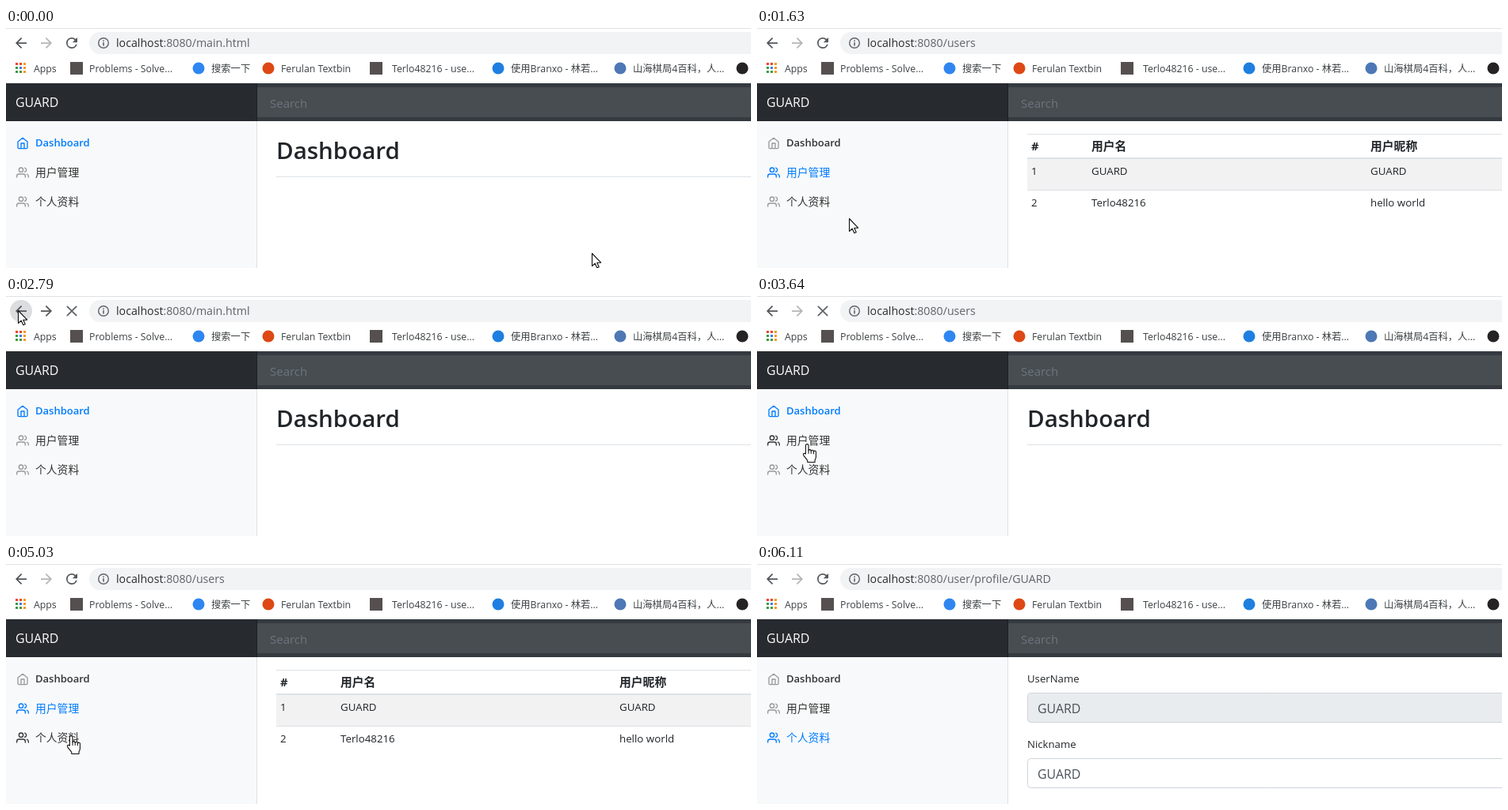
Animation, 940 px wide and 304 px high, one loop 6640 ms. Source, as an HTML page with a canvas:

```html
<!DOCTYPE html>
<html lang="en">
<head>
<meta charset="utf-8">
<title>Dashboard walkthrough</title>
<style>
html, body { margin: 0; width: 100%; height: 100%; overflow: hidden; background: #fff; }
canvas { display: block; width: 940px; height: 304px; }
</style>
</head>
<body>
<canvas id="stage" width="940" height="304"></canvas>
<script>
const ctx = document.getElementById('stage').getContext('2d');
const W = 940, H = 304, LOOP = 6640;
const SANS = '"Open Sans", "Noto Sans CJK SC", "Noto Sans CJK", sans-serif';
const INK = '#212529', BLUE = '#007bff', GREY = '#5f6368', LINE = '#dee2e6';
const USER = 'GUARD', MEMBER = 'Terlo48216';

// [time, value] pairs; each value holds until the next one
const pages = [[0, 'dash'], [1090, 'users'], [2790, 'dash'], [3710, 'users'], [5420, 'profile']];
const urls = [[0, 'main.html'], [1010, 'users'], [2790, 'main.html'], [3640, 'users'],
  [5340, 'user/profile/' + USER]];

// [start, end] spans
const loading = [[860, 1090], [2710, 2940], [3560, 3710], [5260, 5420]];
const clicks = [[790, 860], [2640, 2710], [3480, 3560], [5190, 5260]];
const backHover = [[2640, 2860]];
const canForward = [[2790, 3640]];

// Pointer moves: start, end, then one point per step
const moves = [
  [70, 300, [500, 236], [190, 156], [64, 140], [40, 179]],
  [470, 540, [49, 180], [55, 180]],
  [1090, 1250, [92, 236], [118, 267], [121, 262]],
  [1630, 2240, [116, 241], [106, 214], [92, 186], [72, 152], [48, 120], [24, 92], [8, 70], [30, 54], [49, 46]],
  [2330, 2480, [24, 26], [13, 13], [15, 18]],
  [2860, 3250, [20, 46], [34, 100], [50, 165], [62, 205], [66, 217], [64, 204]],
  [3330, 3480, [64, 197], [63, 190], [63, 188]],
  [4040, 4250, [76, 212], [260, 245], [540, 282], [654, 290]],
  [4500, 5110, [690, 288], [798, 270], [640, 240], [380, 190], [150, 155], [72, 146], [79, 196], [82, 218], [80, 219]],
  [5490, 5650, [400, 230], [760, 240], [960, 250]],
  [5950, 6110, [815, 302], [838, 301], [838, 330]]
];
const pointer = [[0, [739, 285]]];
for (const [start, end, ...points] of moves) {
  points.forEach((p, k) => {
    const t = start + k * (end - start) / (points.length - 1);
    pointer.push([Math.floor(t / 10) * 10, p]);
  });
}

const at = (track, t) => track.filter(([start]) => start <= t).pop()[1];
const within = (spans, t) => spans.some(([a, b]) => t >= a && t < b);

const shapes = {
  home: new Path2D('M3 9l9-7 9 7v11a2 2 0 0 1-2 2H5a2 2 0 0 1-2-2z M9 22V12h6v10'),
  people: new Path2D('M17 21v-2a4 4 0 0 0-4-4H5a4 4 0 0 0-4 4v2 M9 3a4 4 0 1 0 0 8a4 4 0 0 0 0-8 M23 21v-2a4 4 0 0 0-3-3.87 M16 3.13a4 4 0 0 1 0 7.75'),
  back: new Path2D('M20 11H7.83l5.59-5.59L12 4l-8 8 8 8 1.41-1.41L7.83 13H20z'),
  reload: new Path2D('M17.65 6.35A8 8 0 0 0 12 4a8 8 0 1 0 7.73 10h-2.08A6 6 0 1 1 12 6c1.66 0 3.14.69 4.22 1.78L13 11h7V4z'),
  close: new Path2D('M5.5 5.5l13 13M18.5 5.5l-13 13'),
  arrow: new Path2D('M.5.5V16.5L4.2 13.2 6.8 18.8 9.2 17.8 6.7 12.2H11.6z'),
  hand: new Path2D('M-1.6 12V1.4a1.8 1.8 0 0 1 3.6 0V8a1.6 1.6 0 0 1 3.2.5a1.6 1.6 0 0 1 3.2.8a1.5 1.5 0 0 1 3 1V16c0 2-1.4 3-1.4 4.2V22.5H.8V20.5C-.6 18-3 16-4.4 13.4c-.8-1.7 1-2.8 2.8-1.4z'),
  knuckles: new Path2D('M2 8v3.5M5.2 8.5v3M8.4 9.3v2.6')
};

const links = [
  { page: 'dash', label: 'Dashboard', icon: 'home', font: 13, weight: 600 },
  { page: 'users', label: '用户管理', icon: 'people', font: 13.8, weight: 400 },
  { page: 'profile', label: '个人资料', icon: 'people', font: 13.8, weight: 400 }
];

// icon x, icon colour, round?, text x, text
const bookmarks = [
  [89, '#55504f', false, 105, 'Problems - Solve...'],
  [243, '#2f86f0', true, 259, '搜索一下'],
  [331, '#dd4814', true, 347, 'Ferulan Textbin'],
  [467, '#55504f', false, 487, MEMBER + ' - use...'],
  [621, '#1e7fe0', true, 637, '使用Branxo - 林若...'],
  [775, '#4d78b5', true, 791, '山海棋局4百科，人...'],
  [929, '#252323', true, 950, '']
];

function box(x, y, w, h, color) {
  ctx.fillStyle = color;
  ctx.fillRect(x, y, w, h);
}

function disc(x, y, r, color) {
  ctx.fillStyle = color;
  ctx.beginPath();
  ctx.arc(x, y, r, 0, Math.PI * 2);
  ctx.fill();
}

function text(str, x, y, size, color = INK, weight = 400) {
  ctx.font = `${weight} ${size}px ${SANS}`;
  ctx.fillStyle = color;
  ctx.fillText(str, x, y);
  return x + ctx.measureText(str).width;
}

function shape(name, x, y, scale, { fill, stroke, width = 2, flip = false }) {
  ctx.save();
  ctx.translate(x, y);
  ctx.scale(flip ? -scale : scale, scale);
  if (fill) {
    ctx.fillStyle = fill;
    ctx.fill(shapes[name]);
  }
  if (stroke) {
    ctx.strokeStyle = stroke;
    ctx.lineWidth = width;
    ctx.lineJoin = ctx.lineCap = 'round';
    ctx.stroke(shapes[name]);
  }
  ctx.restore();
}

function drawToolbar(t) {
  box(0, 0, W, 1, '#dee1e6');
  if (within(backHover, t)) disc(19, 19, 14, '#dcdddf');
  shape('back', 8.5, 8.5, .875, { fill: '#54575b' });
  shape('back', 61.5, 8.5, .875, { fill: within(canForward, t) ? '#54575b' : '#b4b6b9', flip: true });
  if (within(loading, t)) shape('close', 72.5, 8.5, .875, { stroke: GREY });
  else shape('reload', 72.5, 8.5, .875, { fill: '#54575b' });

  ctx.fillStyle = '#f1f3f4';
  ctx.beginPath();
  ctx.roundRect(105, 5, W, 28, 14);
  ctx.fill();
  ctx.strokeStyle = GREY;
  ctx.lineWidth = 1.4;
  ctx.beginPath();
  ctx.arc(123, 19, 6.3, 0, Math.PI * 2);
  ctx.stroke();
  box(122.2, 15.5, 1.6, 1.6, GREY);
  box(122.2, 18.2, 1.6, 4.3, GREY);
  const x = text('localhost', 139, 24, 14.2, '#2b2d30');
  text(':8080/' + at(urls, t), x, 24, 14.2, GREY);
}

function drawBookmarks() {
  const [r, y, g, b] = ['#e8492f', '#f29b1d', '#3f9b46', '#3f80e8'];
  [r, r, y, g, b, y, g, g, y].forEach((color, i) =>
    box(12 + i % 3 * 5, 44 + Math.floor(i / 3) * 5, 3, 3, color));
  text('Apps', 35, 56, 12.3, '#3c4043');
  for (const [cx, color, round, x, label] of bookmarks) {
    if (round) disc(cx, 51, 7.5, color);
    else box(cx - 8, 43, 16, 16, color);
    text(label, x, 56, 12.3, '#3c4043');
  }
}

function drawHeader() {
  box(0, 70, W, 48, '#343a40');
  box(0, 70, 317, 48, '#272a2f');
  box(316, 70, 1, 48, '#1d2023');
  box(317, 75, W, 38, '#484d51');
  text(USER, 12, 100, 15.9, '#fff');
  text('Search', 333, 101, 15, '#6c757d');
}

function drawSidebar(page, hovered) {
  box(0, 118, 316, H - 118, '#f8f9fa');
  box(316, 118, 1, H - 118, '#dfe0e1');
  links.forEach((link, i) => {
    const active = link.page === page, y = 138 + i * 37;
    const color = active ? BLUE : hovered === i ? '#333' : '#999';
    shape(link.icon, 13, y, 2 / 3, { stroke: color });
    text(link.label, 37, y + (i ? 13 : 12), link.font, active ? BLUE : '#333', link.weight);
  });
}

function field(label, value, y, fill) {
  text(label, 341, y - 13, 13.2);
  ctx.beginPath();
  ctx.roundRect(341.5, y + .5, W, 37, 4);
  ctx.fillStyle = fill;
  ctx.fill();
  ctx.strokeStyle = '#ced4da';
  ctx.lineWidth = 1;
  ctx.stroke();
  text(value, 354, y + 26, 15.9, '#495057');
}

function row(cells, y, size, weight) {
  cells.forEach((cell, i) => text(cell, [346, 422, 774][i], y, size, INK, weight));
}

const content = {
  dash() {
    text('Dashboard', 341, 166, 29.5, INK, 600);
    box(341, 188, W, 1, LINE);
  },
  users() {
    box(341, 134, W, 1, LINE);
    row(['#', '用户名', '用户昵称'], 155, 14.8, 700);
    box(341, 164, W, 2, LINE);
    box(341, 166, W, 39, '#f2f2f2');
    box(341, 205, W, 1, LINE);
    row(['1', USER, USER], 186, 13.3);
    row(['2', MEMBER, 'hello world'], 226, 13.3);
  },
  profile() {
    field('UserName', USER, 163, '#e9ecef');
    field('Nickname', USER, 246, '#fff');
  }
};

function drawPointer([x, y], onLink, clicked) {
  if (clicked) {
    ctx.globalAlpha = .75;
    disc(x, y - .5, 12, '#f2ee3a');
    ctx.globalAlpha = 1;
  }
  const style = { fill: '#fff', stroke: '#111', width: 1.1 };
  shape(onLink ? 'hand' : 'arrow', x, y, 1, style);
  if (onLink) shape('knuckles', x, y, 1, { stroke: '#111', width: 1 });
}

function render(t) {
  const page = at(pages, t), tip = at(pointer, t);
  const index = Math.floor((tip[1] - 127) / 37);
  const hovered = tip[0] < 316 && links[index] ? index : -1;
  box(0, 0, W, H, '#fff');
  drawToolbar(t);
  drawBookmarks();
  drawHeader();
  drawSidebar(page, hovered);
  content[page]();
  drawPointer(tip, hovered >= 0, within(clicks, t));
}

const began = performance.now();
function tick() {
  render((performance.now() - began) % LOOP);
  requestAnimationFrame(tick);
}
tick();
</script>
</body>
</html>
```
